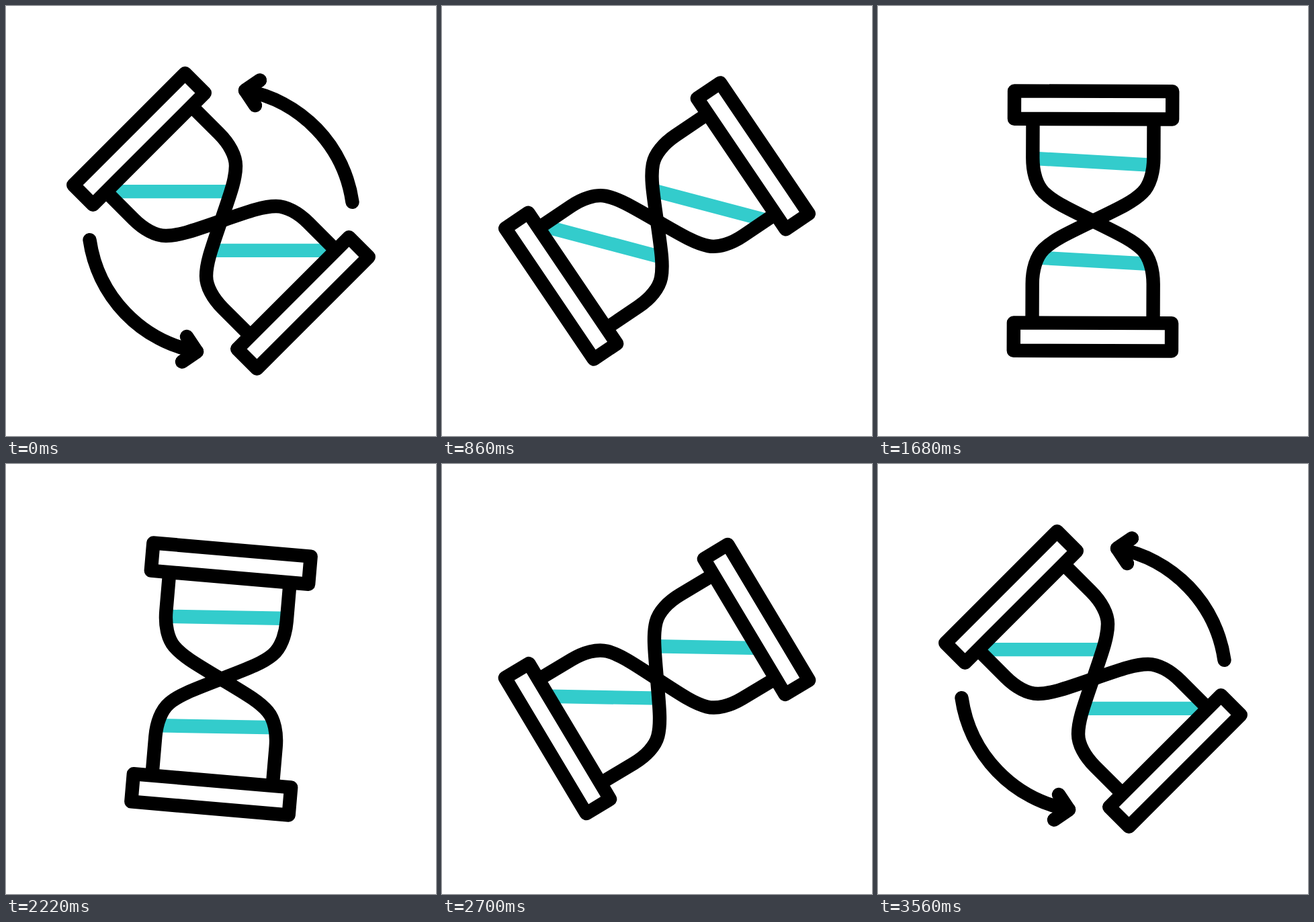
These frames come from a looping animation (640x640 px, 3.6 s). An HTML page:

```html
<!DOCTYPE html>
<html lang="en">
<head>
<meta charset="utf-8">
<title>Turning hourglass</title>
<style>
  html, body { margin: 0; width: 100%; height: 100%; overflow: hidden; background: #fff; }
  svg { display: block; width: 100vw; height: 100vh; }
  .ink { fill: none; stroke: #000; stroke-width: 20.4; stroke-linejoin: round; }
  .round { stroke-linecap: round; }
  .sharp { stroke-linejoin: miter; }
  .sand { stroke: #33cccc; stroke-width: 20.4; }
</style>
</head>
<body>
<svg viewBox="-320 -320 640 640">
  <defs>
    <path id="bulb" d="M-90-147V-94C-90-73-84.5-53.4-73.5-42.4C-60.8-29.7-43.8-21.2 0 0C43.8-21.2 60.8-29.7 73.5-42.4C84.5-53.4 90-73 90-94V-147"/>
    <clipPath id="inside"><use href="#bulb"/></clipPath>
  </defs>
  <g id="arrows"></g>
  <g id="glass"></g>
</svg>
<script>
const LOOP = 3600;
const RADIUS = 197.5;
const TAIL = 8.2, TIP = 79.5;

const turnKeys = [
  [240, -45], [350, -30], [520, -45], [810, -113], [1270, -196.2], [2065, -165],
  [2220, -175], [2380, -207], [2700, -300.6], [3020, -400], [3205, -421],
  [3420, -402], [3560, -405]
];
const tiltKeys = [[240, 0], [520, 20], [1240, 7], [2220, 1], [2700, 1], [3020, 0], [3560, 0]];
const levelKeys = [
  [[240, 62], [520, 77], [1240, 55], [2220, 71], [2700, 92], [3020, 80], [3560, 62]],
  [[240, 62], [520, 39], [1240, 81], [2220, 92], [2700, 54], [3020, 83], [3560, 62]]
];
const trimKeys = [[240, 0], [740, 1], [3060, 1], [3560, 0]];

const byId = id => document.getElementById(id);
const clamp = x => Math.max(0, Math.min(1, x));

// Monotone cubic interpolation: smooth, and level at every turning point.
function at(keys, t) {
  const last = keys.length - 1;
  if (t <= keys[0][0]) return keys[0][1];
  if (t >= keys[last][0]) return keys[last][1];
  const slope = i => (keys[i + 1][1] - keys[i][1]) / (keys[i + 1][0] - keys[i][0]);
  const tangent = i => {
    if (i === 0 || i === last) return 0;
    const a = slope(i - 1), b = slope(i);
    return a * b > 0 ? 2 * a * b / (a + b) : 0;
  };
  let i = 0;
  while (t > keys[i + 1][0]) i++;
  const [t0, v0] = keys[i], [t1, v1] = keys[i + 1];
  const span = t1 - t0, u = (t - t0) / span, w = 1 - u;
  return v0 * w * w * (1 + 2 * u) + v1 * u * u * (3 - 2 * u)
    + span * u * w * (tangent(i) * w - tangent(i + 1) * u);
}

const halves = [0, 180];
byId("arrows").innerHTML = halves.map(a => `<g transform="rotate(${a})" class="ink round">
  <path class="shaft"/><path class="head"/></g>`).join("");
byId("glass").innerHTML = halves.map(a => `<g transform="rotate(${a})" clip-path="url(#inside)">
  <path class="sand" d="M-300 0H300"/></g>`).join("")
  + halves.map(a => `<g transform="rotate(${a})" class="ink">
  <use href="#bulb" class="sharp"/><rect x="-117.6" y="-193.2" width="235.2" height="41.4"/></g>`).join("");

const sands = document.querySelectorAll(".sand");
const shafts = document.querySelectorAll(".shaft");
const heads = document.querySelectorAll(".head");

function onRing(degrees) {
  const a = degrees * Math.PI / 180;
  return `${RADIUS * Math.cos(a)} ${-RADIUS * Math.sin(a)}`;
}

function draw(t) {
  const turn = at(turnKeys, t);
  const tilt = at(tiltKeys, t) - turn;
  byId("glass").setAttribute("transform", `rotate(${turn})`);
  sands.forEach((line, i) =>
    line.setAttribute("transform", `translate(0 ${-at(levelKeys[i], t)}) rotate(${tilt})`));

  const trim = at(trimKeys, t);
  const barb = clamp((1 - trim) / 0.2);
  const shaft = `M${onRing(TAIL + (TIP - TAIL) * trim)}A${RADIUS} ${RADIUS} 0 0 0 ${onRing(TIP)}`;
  const head = `M${36 + 22 * barb} ${-194.5 - 15 * barb}L36-194.5L${36 + 15 * barb} ${-194.5 + 22.5 * barb}`;
  shafts.forEach(p => p.setAttribute("d", shaft));
  heads.forEach(p => p.setAttribute("d", head));
  byId("arrows").setAttribute("visibility", trim < 0.999 ? "visible" : "hidden");
}

function tick() {
  draw(performance.now() % LOOP);
  requestAnimationFrame(tick);
}
tick();
</script>
</body>
</html>
```
